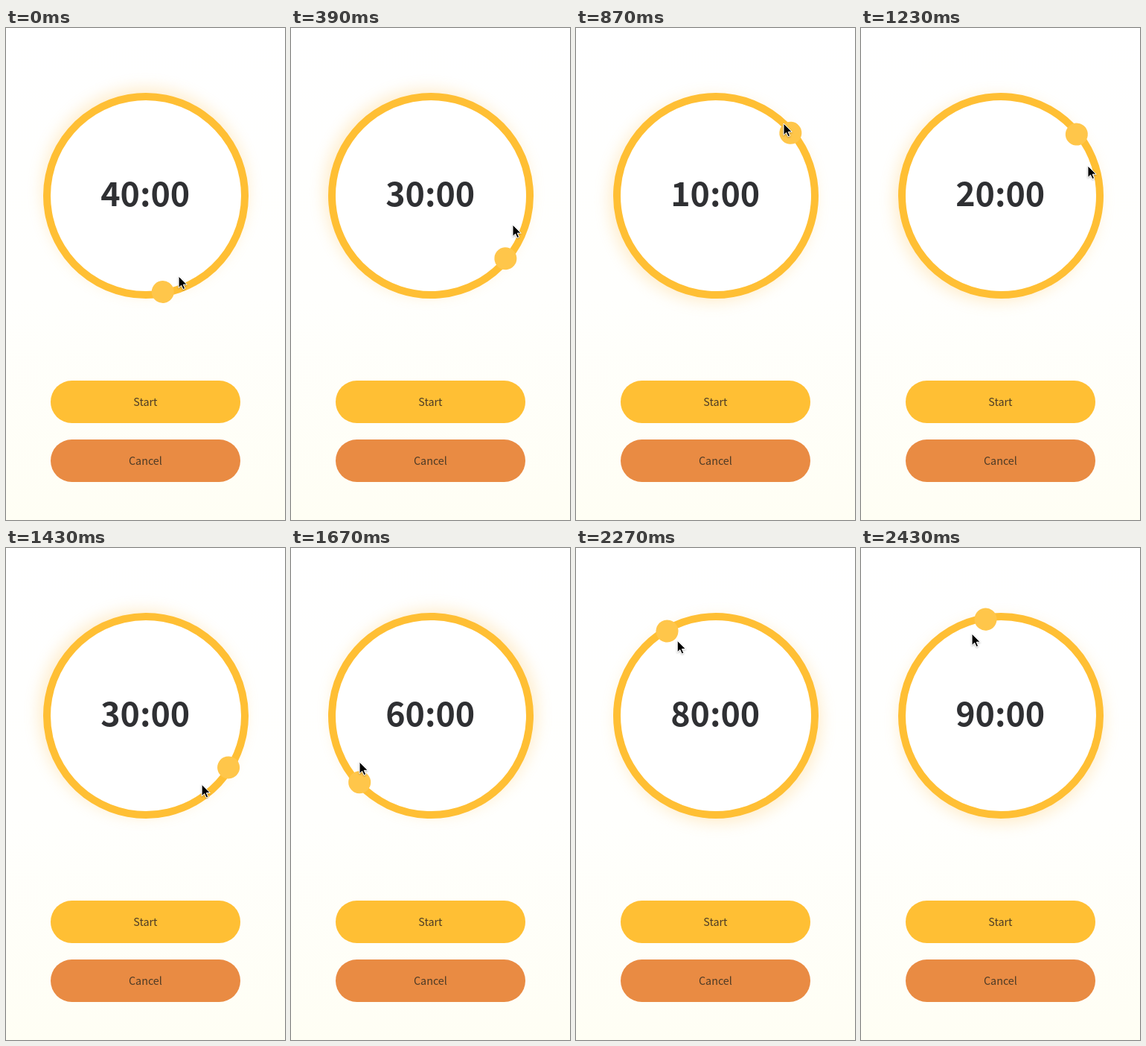
An HTML page for the animation above (2.67 s loop, 375x660 px).

```html
<!DOCTYPE html>
<html lang="en">
<head>
<meta charset="utf-8">
<title>Timer dial</title>
<style>
  html, body { margin: 0; width: 100%; height: 100%; overflow: hidden; }
  body { background: linear-gradient(#fff, #fffffd 55%, #fffef4); }
  svg { display: block; width: 375px; height: 660px; }
  text {
    font-family: "Noto Sans CJK JP", "Noto Sans CJK SC", "Noto Sans CJK", "Open Sans", sans-serif;
    text-anchor: middle;
  }
  #time { font-size: 44.7px; font-weight: 700; fill: #2f3033; }
  .label { font-size: 14.35px; fill: #4b3a26; }
</style>
</head>
<body>
<svg viewBox="0 0 375 660">
  <defs>
    <filter id="blur" x="-25%" y="-25%" width="150%" height="150%">
      <feGaussianBlur stdDeviation="10"/>
    </filter>
    <filter id="drop" x="-50%" y="-50%" width="200%" height="200%">
      <feDropShadow dx="0" dy="1" stdDeviation="0.8" flood-opacity="0.3"/>
    </filter>
  </defs>

  <g transform="translate(188 225)">
    <g id="dial">
      <circle cy="7" r="138" fill="#ffb93c" opacity=".25" filter="url(#blur)"/>
      <circle r="133" fill="#fff" stroke="#ffbf34" stroke-width="10"/>
      <circle cy="-131" r="15" fill="#ffc64a"/>
    </g>
  </g>
  <text id="time" x="187.2" y="238.6">40:00</text>

  <rect x="60" y="473" width="255" height="57" rx="28.5" fill="#ffbf34"/>
  <text class="label" x="187.4" y="507">Start</text>
  <rect x="60" y="552" width="255" height="57" rx="28.5" fill="#e98b43"/>
  <text class="label" x="187.4" y="586">Cancel</text>

  <g transform="translate(188 225)">
    <path id="cursor" d="M0 0V15.6L3.6 12.2L6 17.6L8.6 16.5L6.2 11.2H11.2Z"
          fill="#000" stroke="#fff" stroke-width="1" filter="url(#drop)"/>
  </g>
</svg>
<script>
const LOOP = 2670, STEP = 40, START = 150, END = 2430;
const NOTCH = 40, OFFSET = 10;   // degrees per ten minutes, and where they begin
const TURN = 80, SAMPLES = 40;   // ms the knob takes to reach a new notch

// Key poses of the drag; angles run clockwise from the top
const drag = [
  { t: 110,  angle: 157.8, radius: 116.6, pull: 158 },
  { t: 390,  angle: 109.5, radius: 116.7, pull: 112 },
  { t: 870,  angle: 43.2,  radius: 133,   pull: 50 },
  { t: 990,  angle: 43.2,  radius: 133,   pull: 50 },
  { t: 1230, angle: 71.1,  radius: 123.6, pull: 70.2 },
  { t: 1670, angle: 237.1, radius: 114.3, pull: 240 },
  { t: 2030, angle: 305.5, radius: 106.8, pull: 310.8 },
  { t: 2430, angle: 340.5, radius: 116.7, pull: 350.7 }
];

const $ = id => document.getElementById(id);
const dial = $("dial"), time = $("time"), cursor = $("cursor");

function slope(i, key) {
  const a = drag[i], b = drag[i + 1];
  return a && b ? (b[key] - a[key]) / (b.t - a.t) : 0;
}

function tangent(i, key) {
  const a = slope(i - 1, key), b = slope(i, key);
  return a * b > 0 ? 2 * a * b / (a + b) : 0;
}

// Monotone cubic through the key poses
function along(t, key) {
  const first = drag[0], last = drag[drag.length - 1];
  if (t <= first.t) return first[key];
  if (t >= last.t) return last[key];
  const i = drag.findIndex(p => p.t > t) - 1;
  const a = drag[i], b = drag[i + 1], h = b.t - a.t, u = (t - a.t) / h, v = 1 - u;
  return a[key] * v * v * (1 + 2 * u) + b[key] * u * u * (3 - 2 * u)
    + h * u * v * (v * tangent(i, key) - u * tangent(i + 1, key));
}

const notch = t => Math.round((along(t, "pull") - OFFSET) / NOTCH);

// Averaging the recent notches makes the knob glide after each jump
function knobAngle(t) {
  let sum = 0;
  for (let i = 0; i < SAMPLES; i++) sum += notch(t - TURN * (i + 0.5) / SAMPLES);
  return OFFSET + NOTCH * sum / SAMPLES;
}

function draw(now) {
  const ticks = Math.floor((now % LOOP - START) / STEP);
  const t = ticks < 0 ? 0 : Math.min(END, START + ticks * STEP);

  dial.setAttribute("transform", `rotate(${knobAngle(t)})`);
  time.textContent = notch(t) * 10 + ":00";

  const a = along(t, "angle") * Math.PI / 180, r = along(t, "radius");
  cursor.setAttribute("transform", `translate(${r * Math.sin(a)} ${-r * Math.cos(a)})`);
}

function tick() {
  draw(performance.now());
  requestAnimationFrame(tick);
}
tick();
</script>
</body>
</html>
```
